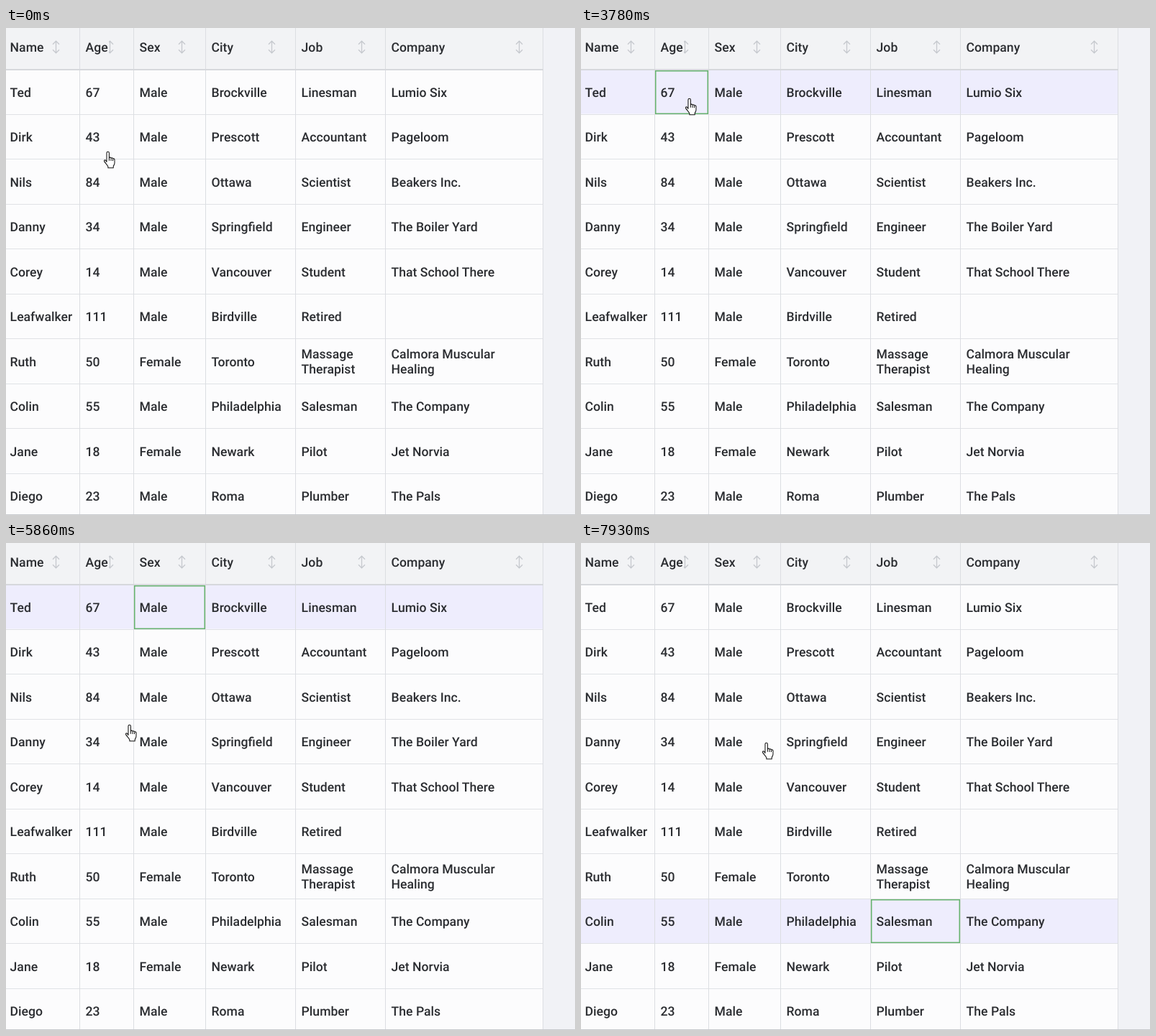
Animation of 791 by 678 pixels, one loop 8000 ms. Source, as an HTML page with a canvas:

```html
<!DOCTYPE html>
<html lang="en">
<head>
<meta charset="utf-8">
<title>Table cell selection</title>
<style>
html, body { margin: 0; width: 100%; height: 100%; overflow: hidden; background: #f1f2f6; }
canvas { display: block; width: 791px; height: 678px; }
</style>
</head>
<body>
<canvas id="stage" width="791" height="678"></canvas>
<script>
const ctx = document.getElementById('stage').getContext('2d');
const LOOP = 8000, TICK = 106.6;
const HEAD = 58, ROW = 62.5, PAD = 8.6;
const edges = [-3, 102, 177, 277, 402, 527, 746];
const heads = ['Name', 'Age', 'Sex', 'City', 'Job', 'Company'];
const rows = [
  ['Ted', '67', 'Male', 'Brockville', 'Linesman', 'Lumio Six'],
  ['Dirk', '43', 'Male', 'Prescott', 'Accountant', 'Pageloom'],
  ['Nils', '84', 'Male', 'Ottawa', 'Scientist', 'Beakers Inc.'],
  ['Danny', '34', 'Male', 'Springfield', 'Engineer', 'The Boiler Yard'],
  ['Corey', '14', 'Male', 'Vancouver', 'Student', 'That School There'],
  ['Leafwalker', '111', 'Male', 'Birdville', 'Retired', ''],
  ['Ruth', '50', 'Female', 'Toronto', 'Massage\nTherapist', 'Calmora Muscular\nHealing'],
  ['Colin', '55', 'Male', 'Philadelphia', 'Salesman', 'The Company'],
  ['Jane', '18', 'Female', 'Newark', 'Pilot', 'Jet Norvia'],
  ['Diego', '23', 'Male', 'Roma', 'Plumber', 'The Pals']
];

// Pointer glides: start time, number of ticks, end x, end y
const glides = [
  [100, 2, 78, 132],
  [640, 4, 14, 106],
  [1070, 4, 45, 89],
  [1510, 2, 43, 84],
  [1830, 1, 30, 69],
  [1940, 2, 42, 86],
  [2596, 3, 50, 89],
  [3140, 7, 145, 98],
  [4230, 8, 236, 97],
  [5320, 1, 231, 192],
  [5427, 7, 140, 277],
  [6190, 1, 150, 290],
  [6280, 2, 270, 343],
  [6610, 8, 262, 484],
  [7490, 2, 450, 512],
  [7710, 3, 252, 278]
];
glides[14][1] = 1;
const clicks = [2270, 3565, 4980, 6190, 7490];

const hand = new Path2D('M4.6 14.6V2.4a1.8 1.8 0 0 1 3.6 0V9c.5-.9 2.4-.8 2.8.5' +
  '.6-.7 2.3-.5 2.6.8.7-.5 2.4-.3 2.6 1.4V16c0 2.5-1.6 3.6-1.9 5.2V23H6.6V21.3' +
  'C5.6 19 2.8 16.6 1 13.9C.4 12.6 2 11.6 3.2 12.7Z');
const knuckles = new Path2D('M8.2 9V13M11 9.8V13.2M13.6 10.8V13.4');
const sortIcon = new Path2D('M0-8V8M-4.5-3.8L0-8.3L4.5-3.8M-4.5 3.8L0 8.3L4.5 3.8');

function rect(color, x, y, w, h) {
  ctx.fillStyle = color;
  ctx.fillRect(x, y, w, h);
}

const rowTop = i => Math.floor(HEAD + ROW * i - .1);

function pointerAt(t) {
  let x = 136, y = 172;
  for (const [t0, ticks, ex, ey] of glides) {
    if (t < t0) break;
    const u = Math.min(1, (Math.floor((t - t0) / TICK) + 1) / ticks);
    x += (ex - x) * u;
    y += (ey - y) * u;
  }
  return { x: Math.round(x), y: Math.round(y) };
}

// The cell under the fingertip at each click
const picks = clicks.map(time => {
  const p = pointerAt(time);
  return {
    time,
    row: Math.floor((p.y - HEAD) / ROW),
    col: edges.findIndex(e => e > p.x + 6) - 1
  };
});

function pickAt(t) {
  const i = picks.findLastIndex(p => p.time <= t);
  const pick = picks[i], next = picks[i + 1];
  // The old row clears one tick before another row lights up
  const leaving = pick && next && next.row !== pick.row && t >= next.time - 120;
  return leaving ? undefined : pick;
}

function label(text, x, base) {
  const lines = text.split('\n');
  lines.forEach((s, i) => {
    ctx.fillText(s, x, Math.round(base + (i - (lines.length - 1) / 2) * 21));
  });
}

function drawSortIcon(col) {
  ctx.save();
  if (col === 1) {
    ctx.beginPath();
    ctx.rect(143, 0, 30, HEAD);
    ctx.clip();
  }
  ctx.translate(edges[col + 1] - 32.5, 26.5);
  ctx.strokeStyle = '#c6c9ce';
  ctx.lineWidth = 1.3;
  ctx.stroke(sortIcon);
  ctx.restore();
}

function drawTint(pick, t) {
  ctx.globalAlpha = t - pick.time < TICK ? .5 : 1;
  rect('#eeedfd', 0, rowTop(pick.row) + 1, 746, ROW - 1);
  ctx.globalAlpha = 1;
}

function drawOutline({ row, col }) {
  const x = edges[col] + 1, y = Math.max(HEAD + 1, rowTop(row) + 1);
  ctx.strokeStyle = '#67b36f';
  ctx.lineWidth = 1.5;
  ctx.strokeRect(x + .75, y + .75, edges[col + 1] - x - 1.5, rowTop(row + 1) - y - 1.5);
}

function drawTable(pick, t) {
  rect('#f1f2f6', 0, 0, 791, 678);
  rect('#f2f3f5', 0, 0, 746, HEAD);
  rect('#fcfcfd', 0, HEAD, 746, 620);
  if (pick) drawTint(pick, t);

  for (let i = 1; i < rows.length; i++) rect('#e0e2e6', 0, rowTop(i), 747, 1);
  for (const x of edges) rect('#dcdee2', x, 0, 1, 678);
  rect('#d6d8dc', 0, 57, 747, 2);
  rect('#c8cace', 0, 677, 791, 1);
  if (pick) drawOutline(pick);

  ctx.font = '500 17.6px Roboto, sans-serif';
  ctx.textRendering = 'geometricPrecision';
  ctx.fillStyle = '#2b2d31';
  heads.forEach((s, c) => {
    label(s, edges[c] + PAD, 33);
    drawSortIcon(c);
  });
  rows.forEach((row, r) => row.forEach((s, c) => label(s, edges[c] + PAD, 95.6 + ROW * r)));
}

function drawPointer({ x, y }) {
  ctx.save();
  ctx.translate(x - .4, y - .3);
  ctx.scale(.95, 1);
  ctx.fillStyle = '#fff';
  ctx.fill(hand);
  ctx.strokeStyle = '#111';
  ctx.lineWidth = 1.1;
  ctx.lineJoin = 'round';
  ctx.stroke(hand);
  ctx.stroke(knuckles);
  ctx.restore();
}

function draw(t) {
  drawTable(pickAt(t), t);
  drawPointer(pointerAt(t));
}

const start = performance.now();
function tick() {
  draw((performance.now() - start) % LOOP);
  requestAnimationFrame(tick);
}
tick();
</script>
</body>
</html>
```
